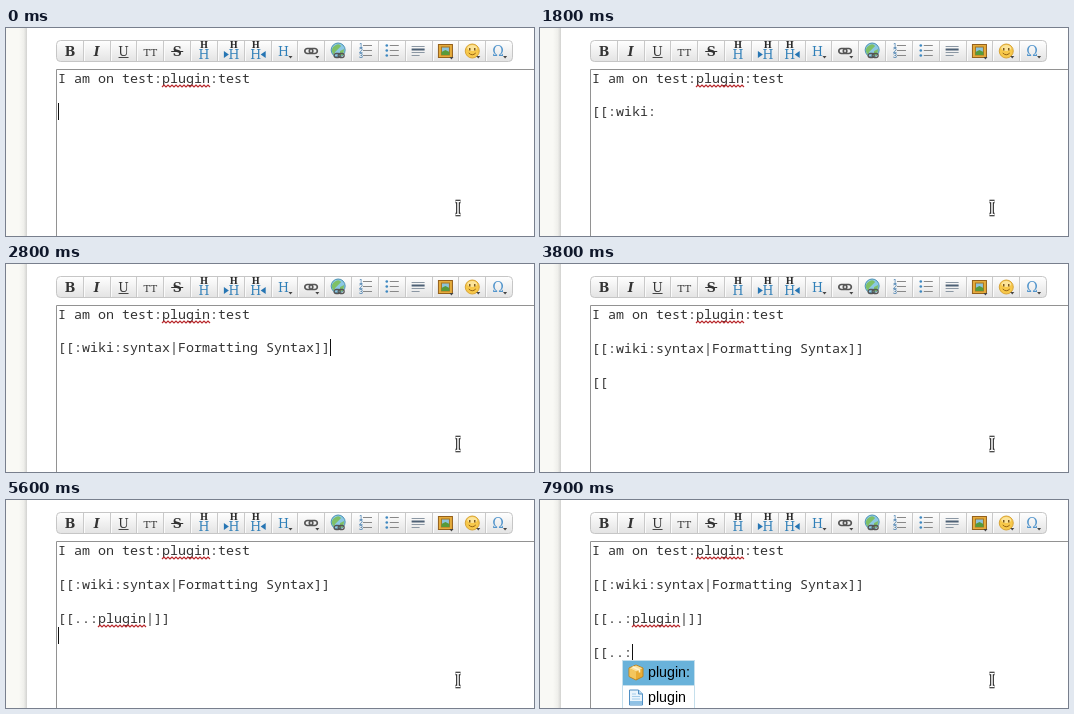
An HTML page that plays this animation: 528 px wide and 208 px high, repeating every 8 s.

```html
<!DOCTYPE html>
<html lang="en">
<head>
<meta charset="utf-8">
<title>Link completion in a wiki editor</title>
<style>
  html, body { margin: 0; width: 100%; height: 100%; overflow: hidden; background: #fff; }
  svg { display: block; }
  text { white-space: pre; }
  .mono { font: 13.333px "Noto Sans Mono", monospace; fill: #333; }
  .item { font: 14.25px "Liberation Sans", Arial, sans-serif; fill: #000; }
  .serif { font-family: "DejaVu Serif", "Noto Serif", serif; fill: #333; text-anchor: middle; }
  .head { font: 12.5px "DejaVu Serif", serif; fill: #2f7fb8; text-anchor: middle; }
  .mini { font: bold 8.5px "DejaVu Serif", serif; fill: #2a2a2a; text-anchor: middle; }
</style>
</head>
<body>
<svg width="528" height="208" viewBox="0 0 528 208">
  <defs>
    <linearGradient id="edge">
      <stop offset="0" stop-color="#f9f9f5"/>
      <stop offset=".6" stop-color="#efefeb"/>
      <stop offset="1" stop-color="#d2d2d0"/>
    </linearGradient>
    <linearGradient id="bar" x2="0" y2="1">
      <stop offset="0" stop-color="#fff"/>
      <stop offset="1" stop-color="#e3e3e3"/>
    </linearGradient>
    <g id="page">
      <path d="M-6.5-7.5H2.5L6.5-3.5V7.5H-6.5Z" fill="#e9f4fc" stroke="#4f8fc4"/>
      <path d="M2.5-7.5V-3.5H6.5" fill="#b5d8f0" stroke="#4f8fc4"/>
      <path d="M-4-3.5H0M-4-1H4M-4 1.5H4" stroke="#a5cdea"/>
      <path d="M-6 3.5H6V7H-6Z" fill="#8fc1e5"/>
    </g>
    <g id="cube">
      <path d="M0-7.5L7-4.5V4L0 7.5L-7 4V-4.5Z" fill="#e9ac35" stroke="#bd8420"/>
      <path d="M0-7L6.5-4.3L0-1L-6.5-4.3Z" fill="#fbe09a"/>
      <path d="M0-1V7L-6.5 3.8V-4.3Z" fill="#f4c65e"/>
      <path d="M-3.5-5.8L3.5-2.5V0" fill="none" stroke="#fff3cf" stroke-width="1.5"/>
    </g>
    <path id="beam" d="M-2.5-6.5H2.5M0-6.5V6.5M-2.5 6.5H2.5"/>
  </defs>
  <rect width="528" height="208" fill="#fff"/>
  <rect width="14" height="208" fill="#f9f9f5"/>
  <rect x="13" width="8" height="208" fill="url(#edge)"/>
  <g id="tools"></g>
  <path d="M528 41.5H50.5V208" fill="none" stroke="#929292"/>
  <g id="editor"></g>
  <g transform="translate(452 180)" fill="none">
    <use href="#beam" stroke="#111" stroke-width="3.6"/>
    <use href="#beam" stroke="#fff" stroke-width="1.6"/>
  </g>
</svg>
<script>
const LOOP = 8000, LEFT = 52, CHAR = 8, LINE = 17, ROW = 25;
const $ = id => document.getElementById(id);

// Toolbar: every icon is drawn around its own centre.
const letter = (s, style, size = 12.5) =>
  `<text class="serif" y="4.5" style="font-size:${size}px;${style}">${s}</text>`;
const head = (x, y) => `<text class="head" x="${x}" y="${y}">H</text>`;
const mini = x => `<text class="mini" x="${x}" y="-3">H</text>`;
const lines = (x1, x2, ys, color) =>
  `<path d="${ys.map(y => `M${x1} ${y}H${x2}`).join('')}" stroke="${color}"/>`;
const arrow = (x, y) => `<path d="M${x} ${y}h4l-2 2.5z" fill="#444"/>`;
const rows = [-5.5, -.5, 4.5];

const icons = [
  letter('B', 'font-weight:bold'),
  letter('I', 'font-style:italic;font-weight:bold'),
  letter('U', '') + lines(-5, 5, [6.5], '#444'),
  letter('TT', '', 10),
  letter('S', 'font-weight:bold') + lines(-6, 6, [.5], '#333'),
  mini(0) + head(0, 8),
  mini(3) + head(3, 8) + '<path d="M-7 0l5 3.5l-5 3.5z" fill="#2675b3"/>',
  mini(-2) + head(-2, 8) + '<path d="M8 0l-5 3.5l5 3.5z" fill="#2675b3"/>',
  head(-1, 5) + arrow(4, 5),
  `<g fill="none" stroke="#555" stroke-width="1.7"><rect x="-6.5" y="-2.5" width="8" height="5" rx="2.5"/>
   <rect x="-2" y="-2.5" width="8" height="5" rx="2.5"/></g>` + arrow(4, 5),
  `<circle r="7" cy="-1" fill="#8cc8e4" stroke="#4c93b4"/>
   <path d="M-5-4Q0-9 3-5L0-2L-3 1L-4 4Q-8 0-5-4ZM2 0L6-2L5 4L1 5Z" fill="#7fc066"/>
   <g fill="none" stroke="#555" stroke-width="1.3"><rect x="-4" y="2.5" width="6" height="4" rx="2"/>
   <rect x="0" y="2.5" width="6" height="4" rx="2"/></g>`,
  lines(-2, 7, rows, '#888') + rows.map((y, i) =>
    `<text x="-6" y="${y + 2.5}" style="font:7px 'Liberation Sans',sans-serif;fill:#2c6da5">${i + 1}</text>`).join(''),
  lines(-2, 7, rows, '#888') + rows.map(y =>
    `<circle cx="-5" cy="${y}" r="1.3" fill="#3e88c0"/>`).join(''),
  lines(-7, 6, [-4.5, 1.5], '#8b97a3') + lines(-7, 1, [4.5], '#8b97a3') +
    '<path d="M-7-1.5H6" stroke="#4d6075" stroke-width="2"/>',
  `<rect x="-7" y="-6.5" width="14" height="13" fill="#e5ac3c" stroke="#94601c"/>
   <rect x="-4" y="-4" width="8" height="8" fill="#8cc4dc" stroke="#a8741f"/>
   <path d="M-4 4V1L0-1L4 1V4Z" fill="#579a3b"/>` + arrow(4, 6),
  `<circle r="7" fill="#f7c84a" stroke="#d8a437"/><ellipse cy="-3" rx="5" ry="3" fill="#fce49a"/>
   <path d="M-3.5 2Q0 5.5 3.5 2" fill="none" stroke="#976414"/>
   <path d="M-2.5-3V-.5M2.5-3V-.5" stroke="#6a4610" stroke-width="1.3"/>` + arrow(4, 5),
  '<text class="head" x="-1" y="5" style="font-size:14px;fill:#5295cc">Ω</text>' + arrow(4, 5)
];
const pitch = 456 / icons.length;
$('tools').innerHTML =
  '<rect x="50.5" y="12.5" width="456" height="21" rx="4" fill="url(#bar)" stroke="#c6c6c6"/>' +
  icons.map((icon, i) => {
    const x = 50.5 + i * pitch, edge = Math.floor(x) + .5;
    const split = i ? `<path d="M${edge} 13V33" stroke="#c9c9c9"/><path d="M${edge + 1} 13V33" stroke="#fbfbfb"/>` : '';
    return `${split}<g transform="translate(${x + pitch / 2} 23)">${icon}</g>`;
  }).join('');

// Menus: column they hang from, width, entries (a trailing colon is a namespace).
const menus = {
  root: [3, 59, ['test:', 'wiki:', 'start']],
  wiki: [8, 302, ['dokuwiki', 'syntax (Formatting Syntax)', 'welcome (Welcome to your new DokuWiki)']],
  up: [4, 44, ['..:']],
  plugin: [4, 73, ['plugin:', 'plugin']]
};

const intro = 'I am on test:plugin:test\n\n';
const first = '[[:wiki:syntax|Formatting Syntax]]';
const second = first + '\n\n[[..:plugin|]]';
const third = second + '\n\n';
const next = first + '\n\n';

// Steps: time, typed text, caret shown, menu, selected entry.
const steps = [
  [0, '', 1], [400, '[', 1], [500, '[[', 1], [800, '[[:', 1],
  [1100, '[[:', 1, 'root', 0], [1400, '[[:', 0, 'root', 1],
  [1700, '[[:wiki:', 0], [2000, '[[:wiki:', 0, 'wiki', 0], [2100, '[[:wiki:', 0, 'wiki', 1],
  [2600, first, 1], [3000, first + '\n', 1], [3200, next, 1],
  [3400, next + '[', 1], [3500, next + '[[', 1], [3700, next + '[[', 0],
  [3900, next + '[[.', 1], [4100, next + '[[..', 1], [4300, next + '[[..', 1, 'up', 0],
  [4600, next + '[[..:', 1, 'plugin', 0], [4800, next + '[[..:', 1, 'plugin', 1],
  [5200, second, 1], [5600, second + '\n', 1], [5800, third, 1],
  [6200, third + '[', 1], [6300, third + '[[', 1], [6500, third + '[[', 0],
  [6800, third + '[[.', 1], [6900, third + '[[..', 1], [7100, third + '[[..', 1, 'up', 0],
  [7400, third + '[[..:', 1, 'plugin', 0]
];

function wave(col, y) {
  let d = `M${LEFT + col * CHAR} ${y}`;
  for (let i = 0; i < 12; i++) d += 'l2 -2l2 2';
  return `<path d="${d}" fill="none" stroke="#b8282c" stroke-width="1.2"/>`;
}

function textLine(s, y) {
  const word = s.indexOf('plugin');
  return `<text class="mono" x="${LEFT}" y="${y}">${s}</text>` + (word < 0 ? '' : wave(word, y + 4));
}

function menu(name, selected, y) {
  const [col, width, items] = menus[name];
  const x = LEFT + col * CHAR - 2, height = items.length * ROW;
  return `<rect x="${x}" y="${y}" width="${width}" height="${height}" fill="#fff"/>` +
    items.map((item, i) => {
      const top = y + i * ROW;
      const fill = i === selected ? '#69b2da' : '#fff';
      const icon = item.endsWith(':') ? 'cube' : 'page';
      return `<rect x="${x}" y="${top}" width="${width}" height="${ROW}" fill="${fill}"/>
        <path d="M${x} ${top + .5}h${width}" stroke="#c5dfec"/>
        <use href="#${icon}" x="${x + 14}" y="${top + 12.5}"/>
        <text class="item" x="${x + 26}" y="${top + 17}">${item}</text>`;
    }).join('') +
    `<rect x="${x + .5}" y="${y + .5}" width="${width - 1}" height="${height - 1}" fill="none" stroke="#c5dfec"/>`;
}

let shown;
function draw(now) {
  const t = now % LOOP;
  const step = steps.findLast(s => s[0] <= t);
  if (step !== shown) {
    shown = step;
    const [, typed, caret, name, selected] = step;
    const text = (intro + typed).split('\n');
    const last = text.length - 1;
    // The first link sits a pixel high until a new line opens below it.
    const lift = last === 2 ? 1 : 0;
    const baseline = i => 55 + i * LINE - (i ? lift : 0);
    const y = baseline(last);
    let out = text.map((s, i) => textLine(s, baseline(i))).join('');
    if (caret) {
      const x = LEFT + text[last].length * CHAR;
      out += `<rect x="${x}" y="${y - 13}" width="1" height="17" fill="#111"/>`;
    }
    if (name) out += menu(name, selected, y + 3);
    $('editor').innerHTML = out;
  }
  requestAnimationFrame(() => draw(performance.now()));
}
draw(performance.now());
</script>
</body>
</html>
```
